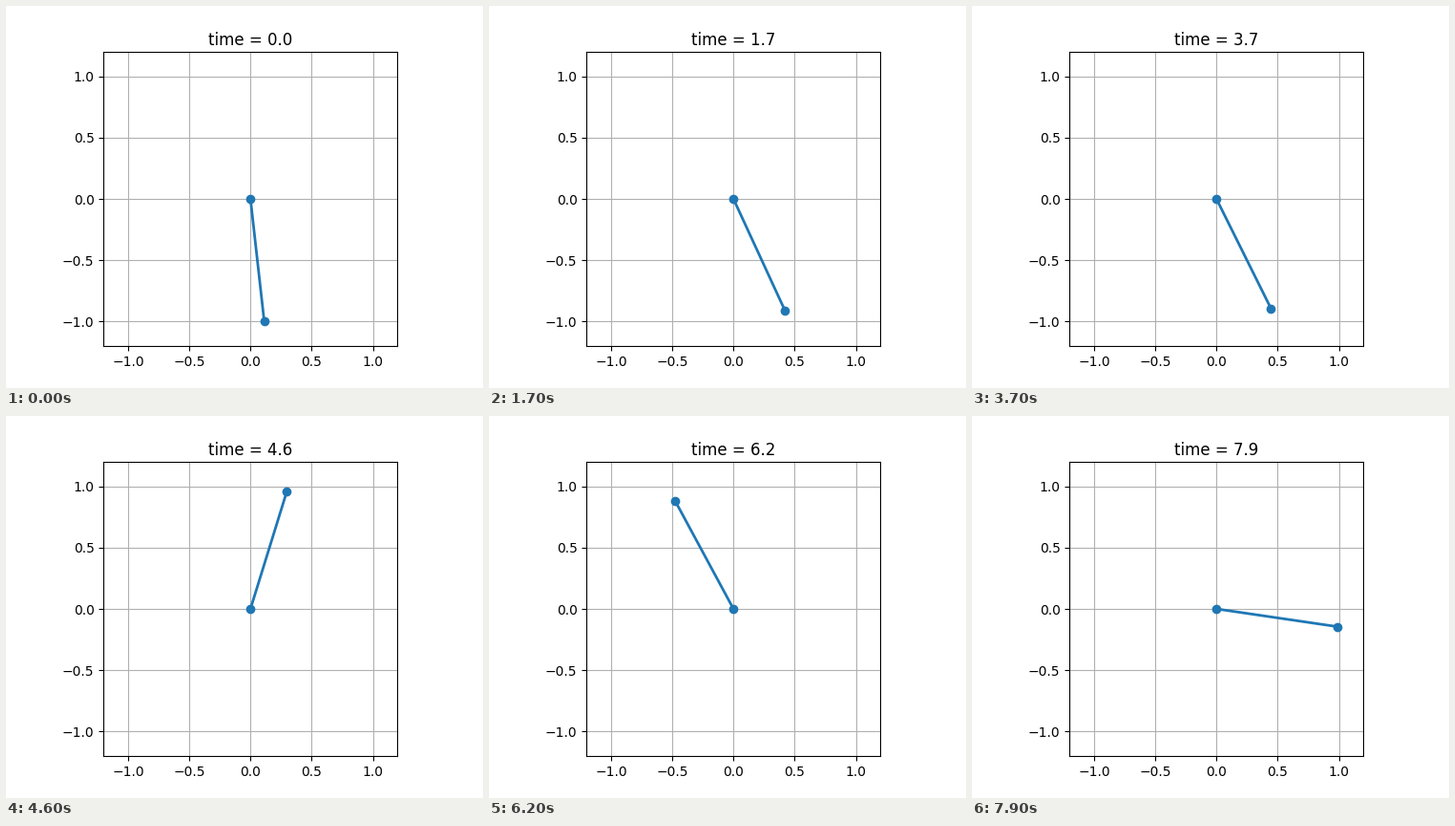
These frames come from a looping animation (500x400 px, 8 s). A matplotlib script:

```python
import numpy as np
import matplotlib.pyplot as plt
from matplotlib.animation import FuncAnimation

FRAMES, STEP = 80, 100  # frame count, ms per frame

# Swing-up of a driven pendulum: a few poses, angle in radians from straight down
POSES = {0: 0.112, 0.9: -0.637, 1.1: -0.745, 1.8: 0.717, 2.5: 2.207,
         3.0: 2.46, 3.7: 0.462, 4.1: -1.85, 4.5: -3.29, 5.0: -3.89,
         5.6: -6.236, 6.3: -9.226, 6.9: -9.903, 7.2: -10.068, 7.9: -11.141}


def spline_slopes(x, y):
    """Slopes of the C2 cubic spline that starts at rest and ends free."""
    h = np.diff(x)
    d = np.diff(y) / h
    n = len(x)
    A, b = np.zeros((n, n)), np.zeros(n)
    A[0, 0] = 1
    for i in range(1, n - 1):
        p, q = 1 / h[i - 1], 1 / h[i]
        A[i, i - 1:i + 2] = p, 2 * (p + q), q
        b[i] = 3 * (d[i - 1] * p + d[i] * q)
    A[-1, -2:] = 1, 2
    b[-1] = 3 * d[-1]
    return np.linalg.solve(A, b)


times = np.array(list(POSES))
angles = np.array(list(POSES.values()))
speeds = spline_slopes(times, angles)


def angle(t):
    i = np.clip(np.searchsorted(times, t, side="right") - 1, 0, len(times) - 2)
    h = times[i + 1] - times[i]
    s = (t - times[i]) / h
    r = 1 - s
    return (r * r * ((1 + 2 * s) * angles[i] + s * h * speeds[i])
            + s * s * ((1 + 2 * r) * angles[i + 1] - r * h * speeds[i + 1]))


fig = plt.figure(figsize=(5, 4), dpi=100)
ax = fig.add_subplot(autoscale_on=False, xlim=(-1.2, 1.2), ylim=(-1.2, 1.2))
ax.set_aspect("equal")
ticks = np.arange(-1, 1.1, 0.5)
ax.set_xticks(ticks)
ax.set_yticks(ticks)
ax.grid()
rod, = ax.plot([], [], "o-", lw=2)
title = ax.set_title("time = 0.0", pad=5.3)


def update(frame):
    t = frame * STEP / 1000
    a = angle(t)
    rod.set_data([0, np.sin(a)], [0, -np.cos(a)])
    title.set_text(f"time = {t:.1f}")
    return rod, title


anim = FuncAnimation(fig, update, frames=FRAMES, interval=STEP,
                     repeat=True, repeat_delay=0, blit=False)
plt.show()
```
